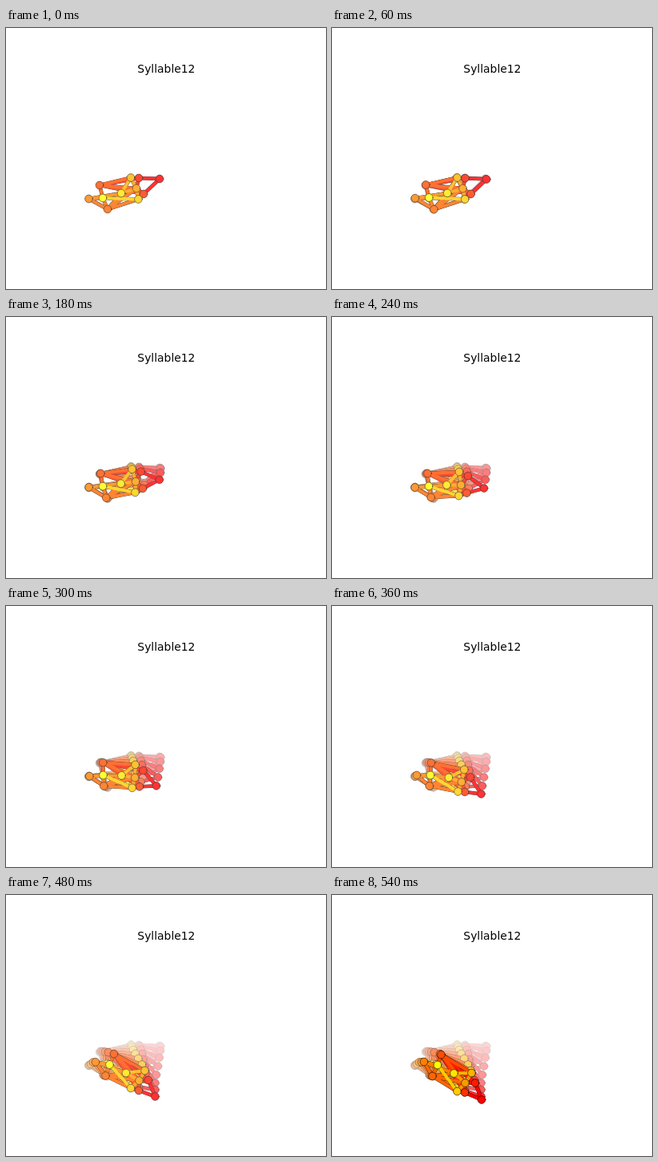
Recreate the animation shown at these times as an HTML page. Size 400 px wide and 327 px high, loop 0.6 s.

```html
<!DOCTYPE html>
<html lang="en">
<head>
<meta charset="utf-8">
<title>Syllable12</title>
<style>
  html, body { margin: 0; width: 100%; height: 100%; overflow: hidden; background: #fff; }
  svg { display: block; width: 400px; height: 327px; }
  text { font: 13.89px "DejaVu Sans", sans-serif; text-anchor: middle; }
</style>
</head>
<body>
<svg id="stage" viewBox="0 0 400 327">
  <g id="poses"></g>
  <text x="200.4" y="56">Syllable12</text>
</svg>
<script>
const STEP = 60, COUNT = 10, VEIL = 0.2;
const KEYS = [0, 2, 4, 6, 7, 8, 9];

// Joint positions at the key steps; a gap (null) is interpolated.
const JOINTS = {
  A: { x: [192, 193, 190, 186.5, 186.5, 186.5, 187],
       y: [189, 195, 214.5, 235.5, 244, 252.5, 256.5] },
  C: { x: [166, 167.5, 170, 173, 174.5, 178, 179],
       y: [188, 190, 199, 214.5, 224, 232, 235.5] },
  B: { x: [172, 173, 168.5, 166, 166, 166, 166],
       y: [208, 210.5, 220.5, 233, 240.5, 245, 247.5] },
  D: { x: [117, null, 119.5, 124, 127.8, 135, 136.5],
       y: [197, null, 196, 196.5, 197, 199, 200] },
  E: { x: [127, null, 123.7, 121.8, 122.5, 124.5, 125.5],
       y: [227, null, 226, 225.5, 226, 226.5, 227] },
  F: { x: [103.5, null, 103.7, 106, 109, 112, 115],
       y: [214, null, 213.5, 212, 209.5, 209.3, 209] },
  G: { x: [163, 163, 161.3, 162, 164, 166.5, 166.5],
       y: [201, 203, 210.5, 220.5, 227, 232.5, 235.5] },
  H: { x: [156, 157, 159, 165.3, 170, 173.5, 174.5],
       y: [187.5, 188.5, 194, 205, 212.5, 220, 223] },
  I: { x: [165.5, 164.5, 158.5, 157.5, 157, 156, 156.5],
       y: [214.5, 216.5, 224, 232.5, 238.5, 242, 246] },
  J: { x: [144, 144, 143.5, 146, 147.5, 150, 152.5],
       y: [207, 207.5, 210.5, 215, 218.5, 223, 223.5] },
  K: { x: [121, null, 121, 123, 125.7, 129.5, 132],
       y: [213, null, 212, 212, 212, 212.5, 213] }
};
// Each bone takes the colour of its first joint.
const BONES = "AC AB CD CG BD BG BI DH DG DK EF EK EI EJ EG FK FJ GH GI GJ HJ IK".split(" ");

const names = Object.keys(JOINTS);
const colour = name => `rgb(255,${Math.round(names.indexOf(name) * 25.5)},0)`;

function add(parent, tag, attrs) {
  const el = document.createElementNS("http://www.w3.org/2000/svg", tag);
  for (const key in attrs) el.setAttribute(key, attrs[key]);
  return parent.appendChild(el);
}

// Cubic through the four known keys around step k.
function at(values, k) {
  const known = KEYS.map((t, i) => [t, values[i]]).filter(p => p[1] !== null);
  const next = known.findIndex(p => p[0] > k);
  const from = next < 0 ? known.length - 4 : Math.min(Math.max(next - 2, 0), known.length - 4);
  const near = known.slice(from, from + 4);
  return near.reduce((sum, [t, v]) =>
    sum + near.reduce((w, [u]) => u === t ? w : w * (k - u) / (t - u), v), 0);
}

function buildPose(parent, k) {
  const pos = {};
  for (const n of names) pos[n] = [at(JOINTS[n].x, k), at(JOINTS[n].y, k)];
  const group = add(parent, "g", { "stroke-linecap": "square" });
  const bone = ([a, b], stroke, width) => add(group, "line", {
    x1: pos[a][0], y1: pos[a][1], x2: pos[b][0], y2: pos[b][1],
    stroke, "stroke-width": width
  });
  for (const b of BONES) bone(b, "#000", 4.6);
  for (const b of BONES) bone(b, colour(b[0]), 4.1);
  for (const n of names) add(group, "circle", {
    cx: pos[n][0], cy: pos[n][1], r: 4.9,
    fill: colour(n), stroke: "#000", "stroke-width": 0.6
  });
  // A white veil fades everything drawn so far.
  if (k < COUNT - 1) add(group, "rect", {
    width: 400, height: 327, fill: "#fff", "fill-opacity": VEIL
  });
  return group;
}

const root = document.getElementById("poses");
const poses = Array.from({ length: COUNT }, (_, k) => buildPose(root, k));

function render(ms) {
  const step = Math.floor(ms / STEP) % COUNT;
  poses.forEach((g, k) => g.setAttribute("display", k <= step ? "inline" : "none"));
}

const start = performance.now();
function tick() {
  render(performance.now() - start);
  requestAnimationFrame(tick);
}
tick();
</script>
</body>
</html>
```
